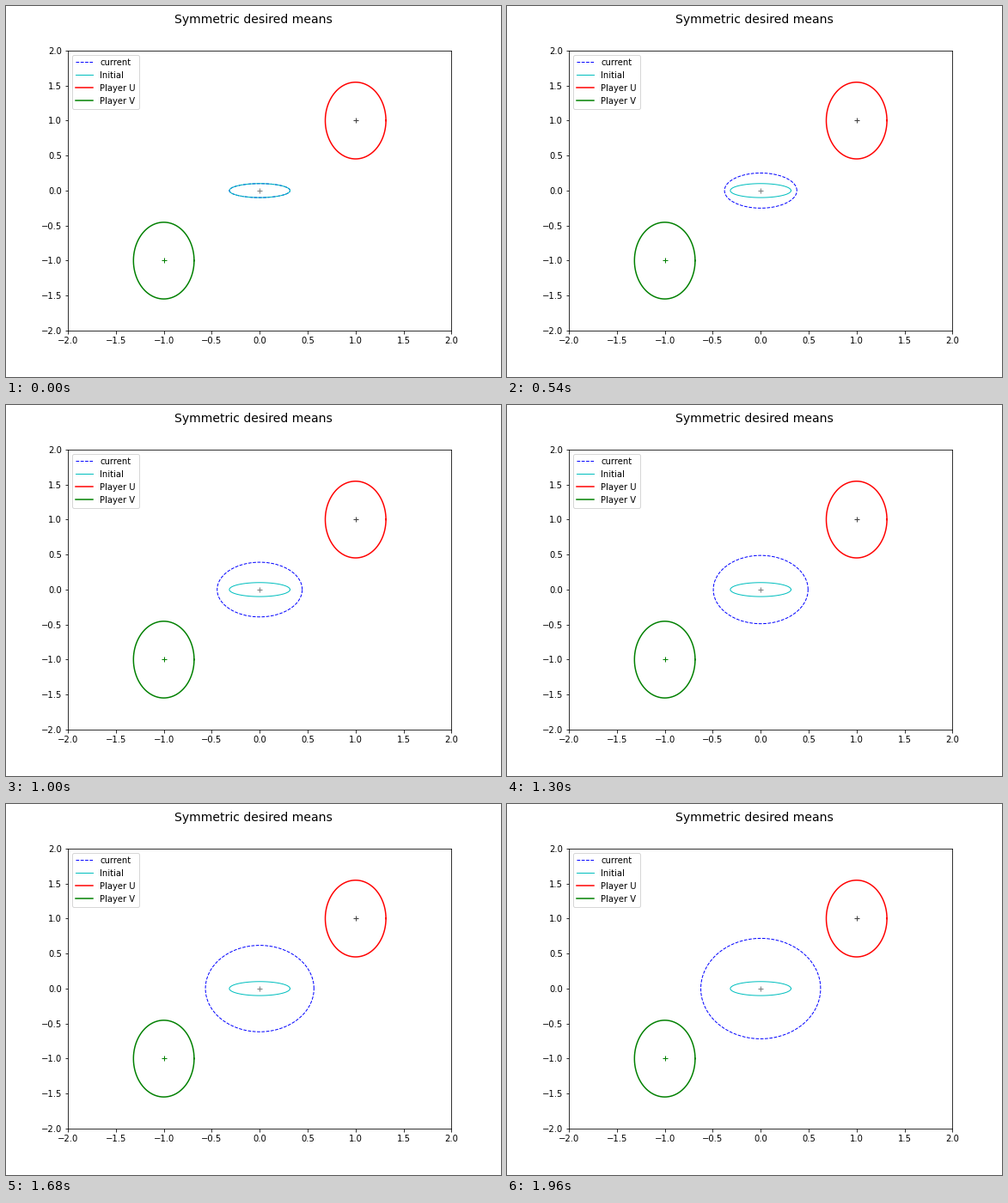
Animation, 576 px wide and 432 px high, one loop 1980 ms. Source, as a matplotlib script:

```python
import numpy as np
import matplotlib.pyplot as plt
from matplotlib.animation import FuncAnimation

FRAMES, STEP_MS = 99, 20
THETA = np.linspace(0, 2 * np.pi, 100)

plt.rcParams.update({"font.family": "DejaVu Sans", "font.size": 10})
fig = plt.figure(figsize=(8, 6), dpi=72, facecolor="white")
fig.subplots_adjust(left=0.125, right=0.9, bottom=0.125, top=0.88)
ax = fig.add_subplot()
ax.set(xlim=(-2, 2), ylim=(-2, 2))
fig.suptitle("Symmetric desired means", fontsize=14)


def ellipse(cx, cy, rx, ry):
    return cx + rx * np.cos(THETA), cy + ry * np.sin(THETA)


def radii(n):
    """Half axes of the spreading ellipse after n steps."""
    rx = np.sqrt(0.1) + 1.92e-3 * n + 1.25e-5 * n**2
    ry = 0.1 + 5.3e-3 * n + 1.02e-5 * n**2
    return rx, ry


current, = ax.plot(*ellipse(0, 0, *radii(0)), "b--", lw=1, label="current")
ax.plot(*ellipse(0, 0, np.sqrt(0.1), 0.1), "c", lw=1, label="Initial")
ax.plot(*ellipse(1, 1, np.sqrt(0.1), np.sqrt(0.3)), "r", lw=1.5, label="Player U")
ax.plot(*ellipse(-1, -1, np.sqrt(0.1), np.sqrt(0.3)), "g", lw=1.5, label="Player V")

for pos, color in ((0, "#808080"), (1, "#404040"), (-1, "g")):
    ax.plot(pos, pos, "+", color=color, ms=6)

ax.legend(loc="upper left")


def update(n):
    current.set_data(*ellipse(0, 0, *radii(n)))
    return current,


anim = FuncAnimation(fig, update, frames=FRAMES, interval=STEP_MS,
                     repeat=True, repeat_delay=0)
plt.show()
```
